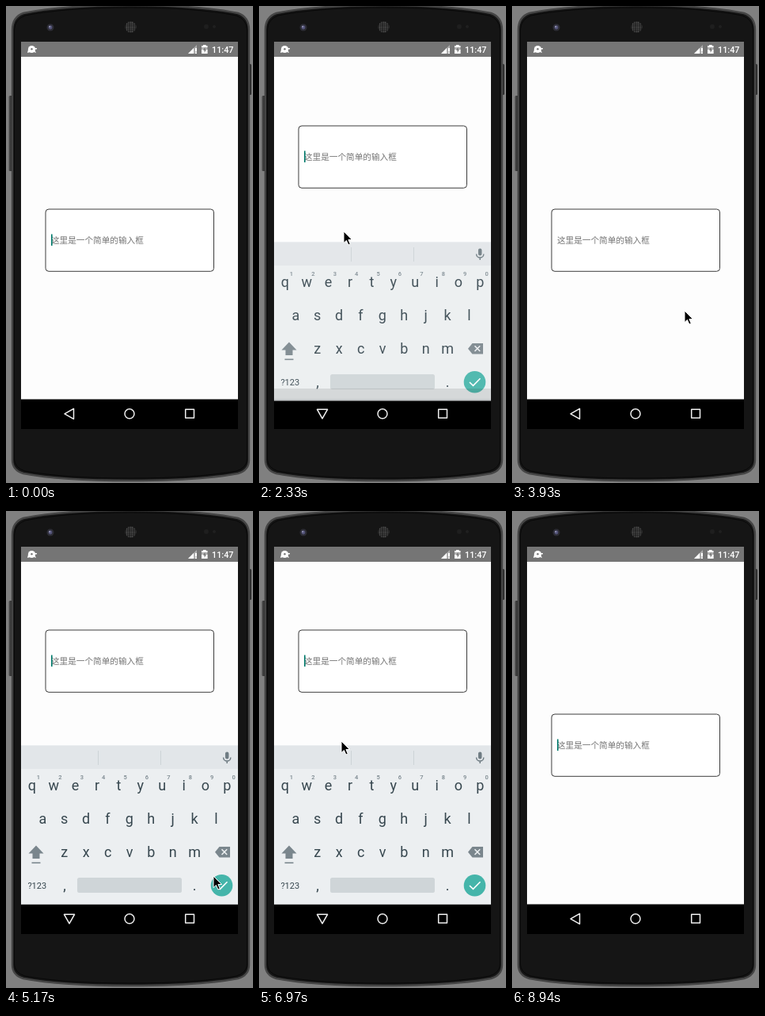
Recreate the animation shown at these times as an HTML page. Size 312x601 px, loop 9.12 s.

```html
<!DOCTYPE html>
<html lang="zh">
<head>
<meta charset="utf-8">
<title>Input box</title>
<style>
  html, body { margin: 0; width: 100%; height: 100%; overflow: hidden; background: #808080; }
  svg { display: block; width: 312px; height: 601px; }
  text { font-family: Roboto, sans-serif; }
  .hint { font: 10.64px "Noto Sans CJK SC", "Noto Sans CJK", sans-serif; fill: #757575; }
  .key { font-size: 18px; fill: #37474f; text-anchor: middle; }
  .digit { font-size: 7.5px; font-weight: 500; fill: #78858c; text-anchor: middle; }
  .nav { fill: none; stroke: #f0f0f0; stroke-width: 1.5; stroke-linejoin: round; }
</style>
</head>
<body>
<svg viewBox="0 0 312 601">
  <defs>
    <linearGradient id="side">
      <stop offset="0" stop-color="#555"/><stop offset="1" stop-color="#1b1b1b"/>
    </linearGradient>
    <pattern id="mesh" width="2.4" height="2.4" patternUnits="userSpaceOnUse">
      <rect width="2.4" height="2.4" fill="#151515"/><circle cx="1.2" cy="1.2" r=".8" fill="#6a6a6a"/>
    </pattern>
  </defs>

  <!-- phone -->
  <rect width="312" height="601" fill="#808080"/>
  <rect x="3.5" y="113" width="5" height="95" rx="1.5" fill="url(#side)"/>
  <rect x="306" y="73" width="4" height="39" rx="1.5" fill="#2c2c2c"/>
  <path d="M8 30Q8 14 22 9Q70 -1 157 -1T293 9Q307 14 307 30V572Q307 585 293 589Q245 598 157 598T22 589Q8 585 8 572Z"
        fill="#161616" stroke="#454545" stroke-width="2.4"/>
  <path d="M10.5 30Q11 17 24 12Q75 2 157 2T291 12Q304 17 304.5 30V571Q304 582 291 586Q240 595 157 595T24 586Q11 582 10.5 571Z"
        fill="#151515" stroke="#080808"/>
  <circle cx="56" cy="27" r="4.5" fill="#2d2d35"/>
  <circle cx="56" cy="27" r="2.4" fill="#55557a"/>
  <circle cx="55.2" cy="26" r="1" fill="#9999b8"/>
  <circle cx="157.5" cy="26.5" r="7" fill="url(#mesh)"/>
  <circle cx="253" cy="26" r="3" fill="#1f1f1f"/>
  <circle cx="263" cy="26" r="2" fill="#202020"/>

  <!-- screen -->
  <rect x="19" y="45" width="274" height="488" fill="#fdfdfd"/>
  <rect x="19" y="45" width="274" height="19" fill="#757575"/>
  <g fill="#fff">
    <circle cx="32.5" cy="54.5" r="4.6"/>
    <path d="M28 55L27 59L31 58ZM35 58L38 59L36 55ZM36 53H39V54.5H36Z"/>
    <circle cx="32.5" cy="54.2" r="1.2" fill="#757575"/>
    <path d="M230 60L241 49V60Z" opacity=".4"/>
    <path d="M230 60L237 53V60ZM239 53H241V57.5H239ZM239 58.5H241V60H239Z"/>
    <path d="M249 49H252.5V50.2H254.5V60H247V50.2H249Z" opacity=".45"/>
    <path d="M247 55H254.5V60H247ZM249 49H252.5V50.2H254.5V52H247V50.2H249Z"/>
    <path d="M251.5 51.5L249 55.8H250.6V59L253 54.8H251.5Z" fill="#757575"/>
    <text x="260" y="58.7" font-size="10.8" font-weight="500">11:47</text>
  </g>

  <g id="field">
    <rect x="50" y="256" width="212.5" height="78.3" rx="4" fill="#fff" stroke="#3c3c3c"/>
    <text class="hint" x="57" y="299">这里是一个简单的输入框</text>
    <rect id="caret" x="57" y="287.5" width="1.6" height="14.5" fill="#00796b"/>
  </g>

  <rect x="19" y="495.5" width="274" height="37.5" fill="#000"/>
  <g id="keyboard">
    <rect x="19" y="295.5" width="274" height="200" fill="#eceff1"/>
    <rect x="19" y="295.5" width="274" height="29.5" fill="#e2e6e9"/>
    <path d="M116.5 302V320M195.5 302V320" stroke="#cdd3d6"/>
    <g stroke="#6f7c83" fill="none" stroke-width="1.5">
      <rect x="277.7" y="304.2" width="3" height="7.6" rx="1.5" fill="#6f7c83"/>
      <path d="M274.6 310.5A4.6 4.6 0 0 0 283.8 310.5M279.2 315V318"/>
    </g>
    <g id="keys"></g>
    <g fill="#7a868d">
      <path d="M38 421.5L47.5 431.5H42.5V438H33.5V431.5H28.5Z"/>
      <rect x="32.5" y="442.5" width="11" height="1.6"/>
      <path d="M269.5 423H283V436.5H269.5L264 429.8Z"/>
      <path d="M272.5 426.3L279.2 433M279.2 426.3L272.5 433" stroke="#eceff1" stroke-width="1.6"/>
    </g>
    <rect x="90" y="462" width="132" height="19" rx="2.5" fill="#cfd5d8"/>
    <circle cx="272.5" cy="471.7" r="13.8" fill="#45b5aa"/>
    <path d="M266 472L270.5 476.3L279.5 467.2" fill="none" stroke="#fff" stroke-width="1.6"/>
    <rect id="shade" x="19" y="480" width="274" height="15.5" fill="#000" opacity=".11"/>
  </g>

  <path id="back" class="nav" d="M74 513.8L85.5 507.3V520.3Z"/>
  <circle class="nav" cx="156" cy="513.8" r="6"/>
  <rect class="nav" x="226.7" y="508.3" width="10.8" height="10.8"/>
  <path id="mouse" d="M0 0V14.6L3.4 11.4L5.9 17L8.3 16L5.9 10.5H10.5Z" fill="#000" stroke="#fff"/>
</svg>

<script>
const $ = id => document.getElementById(id);
const LOOP = 9120, START = 350, STEP = 178.5;
const PITCH = 27.4;

// Pointer path: [step, x, y]
const PATH = [
  [0, 152, 415], [2, 128, 335], [4, 107, 288], [8, 107, 288], [9, 107, 284],
  [13, 107, 284], [16, 264, 460], [17, 268, 464], [18, 299, 440], [20, 218, 384],
  [22, 110, 291], [25, 110, 291], [27, 262, 460], [30, 266, 468], [31, 266, 469],
  [34, 104, 290], [38, 104, 290], [42, 273, 493], [43, 266, 468], [45, 266, 470],
  [47, 260, 578]
];
// Keyboard visible from the first step up to the second
const SHOWN = [[11, 17], [24, 29], [36, 45]];

function label(text, x, y, cls = "key", size) {
  const el = document.createElementNS("http://www.w3.org/2000/svg", "text");
  el.textContent = text;
  el.setAttribute("class", cls);
  el.setAttribute("x", x);
  el.setAttribute("y", y);
  if (size) el.style.fontSize = size + "px";
  $("keys").append(el);
}

function row(letters, x, y) {
  [...letters].forEach((c, i) => label(c, x + i * PITCH, y));
}

row("qwertyuiop", 32.8, 352);
row("asdfghjkl", 46.3, 394);
row("zxcvbnm", 73.8, 436);
[..."1234567890"].forEach((c, i) => label(c, 41 + i * PITCH, 337.5, "digit"));
label("?123", 39.3, 475.5, "key", 11);
label(",", 74, 478);
label(".", 238, 478);

function pointer(step) {
  const i = PATH.findIndex(p => p[0] >= step);
  if (step < 0 || i < 0) return null;
  const b = PATH[i], a = PATH[Math.max(0, i - 1)];
  const u = b === a ? 0 : (step - a[0]) / (b[0] - a[0]);
  return [a[1] + (b[1] - a[1]) * u, a[2] + (b[2] - a[2]) * u];
}

function show(el, on) {
  el.style.display = on ? "" : "none";
}

function draw(time) {
  const step = Math.floor((time % LOOP - START) / STEP);
  const open = SHOWN.find(([from, to]) => step >= from && step < to);
  const rising = open && step === open[0];
  const blink = Math.floor(step / 3) % 2 !== 0;

  $("field").setAttribute("transform", `translate(0 ${open ? (rising ? -105 : -106) : 0})`);
  show($("caret"), step < 36 ? blink : !blink);

  show($("keyboard"), open);
  show($("shade"), rising);
  $("keyboard").setAttribute("transform", `translate(0 ${rising ? 2 : 0})`);
  $("keyboard").setAttribute("opacity", rising ? 0.92 : 1);
  $("back").setAttribute("transform", open ? "rotate(-90 80 513.8)" : "");

  const at = pointer(step);
  show($("mouse"), at);
  if (at) $("mouse").setAttribute("transform", `translate(${at})`);
}

const began = performance.now();
function tick() {
  draw(performance.now() - began);
  requestAnimationFrame(tick);
}
tick();
</script>
</body>
</html>
```
